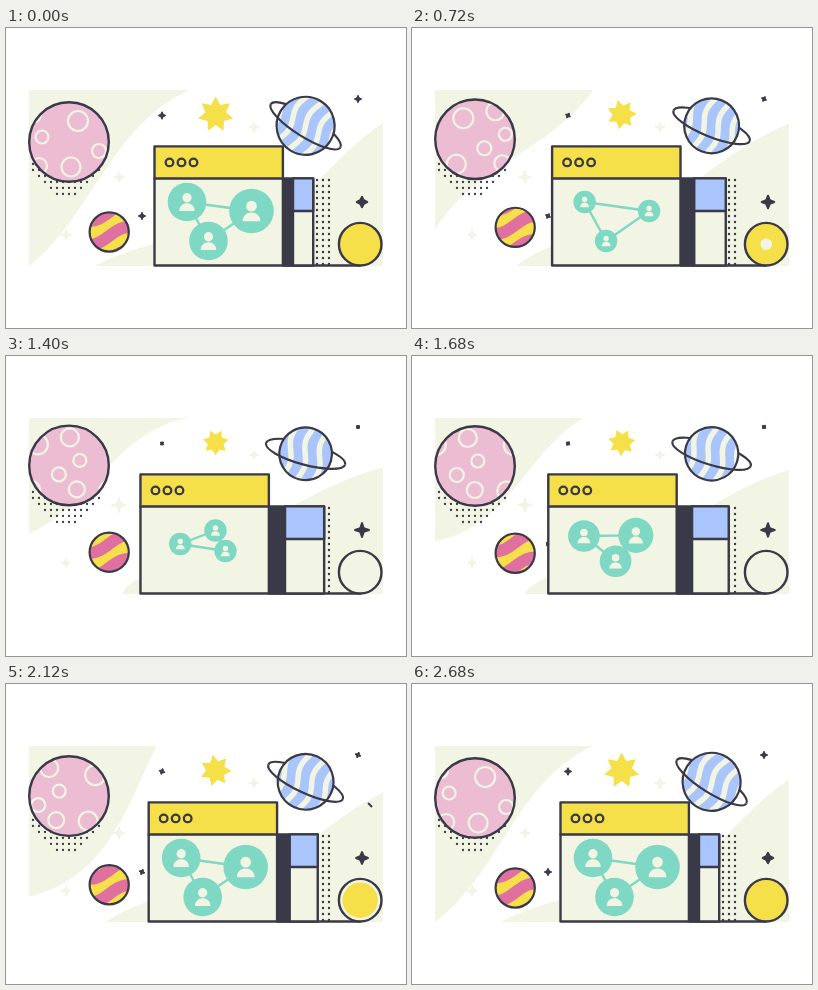
An HTML page with a canvas for the animation above (2.72 s loop, 400x300 px).

```html
<!DOCTYPE html>
<html lang="en">
<head>
<meta charset="utf-8">
<title>Planets and network</title>
<style>
html, body { margin: 0; width: 100%; height: 100%; overflow: hidden; background: #fff; }
canvas { display: block; width: 400px; height: 300px; }
</style>
</head>
<body>
<canvas id="stage" width="400" height="300"></canvas>
<script>
const LOOP = 2720, STEP = 40, TAU = Math.PI * 2;
const INK = '#3a3947', CREAM = '#f2f4e4', YELLOW = '#f6e04a', PINK = '#ecbcd3',
      ROSE = '#e0709f', BLUE = '#a9c5fc', TEAL = '#7fd8c3';
const c = document.getElementById('stage').getContext('2d');
c.lineJoin = 'round';

const { sin, cos, max, min } = Math;
const lerp = (a, b, k) => a + (b - a) * k;
const clamp = k => max(0, min(1, k));
const ease = k => (1 - cos(Math.PI * clamp(k))) / 2;
const span = (t, a, b) => ease((t - a) / (b - a));
const mod = (v, n) => ((v % n) + n) % n;

function paint(fill, stroke, width = 2.4) {
  if (fill) { c.fillStyle = fill; c.fill(); }
  if (stroke) { c.strokeStyle = stroke; c.lineWidth = width; c.stroke(); }
}
function disc(x, y, r, fill, stroke, width) {
  c.beginPath();
  c.arc(x, y, max(0, r), 0, TAU);
  paint(fill, stroke, width);
}
function box(x, y, w, h, fill, stroke) {
  c.beginPath();
  c.rect(x, y, w, h);
  paint(fill, stroke);
}
function line(x1, y1, x2, y2, color, width) {
  c.beginPath();
  c.moveTo(x1, y1);
  c.lineTo(x2, y2);
  paint(null, color, width);
}
function star(x, y, points, outer, inner, turn, color, round) {
  c.beginPath();
  for (let i = 0; i < points * 2; i++) {
    const a = turn - Math.PI / 2 + i * Math.PI / points, r = i % 2 ? inner : outer;
    c.lineTo(x + r * cos(a), y + r * sin(a));
  }
  c.closePath();
  paint(color, round && color, round);
}
// Globe at the current origin: fill, clipped pattern, outline
function globe(r, color, pattern, width) {
  disc(0, 0, r, color);
  c.save();
  c.clip();
  pattern();
  c.restore();
  disc(0, 0, r, null, INK, width);
}
function at(x, y, draw) {
  c.save();
  c.translate(x, y);
  draw();
  c.restore();
}

// Two cream hills whose edges sway over the loop
function land(p, k) {
  const a = TAU * p;
  c.save();
  c.beginPath();
  c.rect(23, 62, 354, 176);
  c.clip();

  const top = 175 + 15 * sin(a) + 10 * cos(2 * a - 0.6), side = lerp(238, 177, k);
  const dx = top - 23, dy = side - 62, len = Math.hypot(dx, dy);
  const bend = (u, out) => [top - dx * u + out * dy / len, 62 + dy * u + out * dx / len];
  c.beginPath();
  c.moveTo(23, 62);
  c.lineTo(top, 62);
  c.bezierCurveTo(...bend(1 / 3, -8 - 26 * cos(2 * a)), ...bend(2 / 3, 13 - 35 * sin(a)), 23, side);
  paint(CREAM);

  const y = 103 - 11 * sin(a + 0.8);
  c.beginPath();
  c.moveTo(377, 238);
  c.lineTo(377, y);
  c.quadraticCurveTo(lerp(348, 335, k), y + lerp(18, 10, k), lerp(290, 270, k), y + lerp(82, 48, k));
  c.lineTo(165, 212);
  c.quadraticCurveTo(125, 220, lerp(88, 116, k), 238);
  paint(CREAM);
  c.restore();
}

function sparkles(k) {
  const spark = (x, y, a, b, color, turn = 0) => {
    const r = lerp(a, b, k);
    star(x, y, 4, r, 1 + r * 0.2, turn, color, 1);
  };
  spark(113, 149, 5, 7.5, CREAM);
  spark(60, 207, 5.5, 4.5, CREAM);
  spark(248, 99, 5.5, 4.5, CREAM);
  for (const [x, y] of [[156, 87.5], [352, 71], [136, 188]])
    spark(x, y, 3.8, 2, INK, k * Math.PI / 4);
  star(356, 174, 4, lerp(5.2, 7, k), 2.5, 0, INK, 2);
}

function meteor(t, start, x, y, dx, dy, color) {
  const head = span(t, start, start + 240), tail = 1 - (1 - clamp((t - start - 40) / 620)) ** 2;
  if (head > 0 && tail < 1) {
    const q = min(tail, head);
    line(x + dx * q, y + dy * q, x + dx * head, y + dy * head, color, 2);
  }
}

// x, y, radius from the middle of the moon
const CRATERS = [[9, -21, 10], [-27, -5, 6.5], [30, 9, 7], [2, 25, 9.5], [-30, 24, 8], [41, -28, 9]];

function moon(p, k) {
  for (let row = 0; row < 6; row++) {
    const half = min(33, 39 - 6 * row);
    for (let x = -half; x <= half; x += 6) disc(60 + x, 136 + 6 * row, 1.15, INK);
  }
  at(63, 114 - 4.6 * k, () => globe(39.8, PINK, () => {
    for (const [x, y, r] of CRATERS) {
      const cx = mod(x - 78 * p + 53, 78) - 53;
      disc(cx, y, r, null, CREAM, 2.2);
      disc(cx + 78, y, r, null, CREAM, 2.2);
    }
  }));
}

function marble(p, k) {
  at(103.2, 204 - 7.8 * k, () => globe(19.6, YELLOW, () => {
    for (let n = -1; n < 3; n++) {
      c.beginPath();
      for (let x = -24; x <= 24; x += 2)
        c.lineTo(x, 4 + 24 * (n - p) - 7 * sin(x / 11) - x * 0.1);
      paint(null, ROSE, 12);
    }
  }, 2.2));
}

function planet(p, k) {
  const ring = (a, b) => {
    c.beginPath();
    c.ellipse(0, 0, 41, 11, 0, a, b);
    paint(null, INK, 2.2);
  };
  at(299.6, 97.8, () => {
    c.rotate(lerp(32, 15, k) * Math.PI / 180);
    ring(Math.PI, TAU);
    globe(lerp(29, 26.3, k), BLUE, () => {
      for (let n = -2; n < 5; n++) {
        c.beginPath();
        for (let y = -32; y <= 32; y += 2)
          c.lineTo(15 * (n - 2 * p % 1) + 2.8 * sin(y / 7.5), y);
        paint(null, CREAM, 5.5);
      }
    }, 2.2);
    ring(0, Math.PI);
  });
}

function ball(t) {
  const x = 354.2, y = 216.2, r = 21.3;
  disc(x, y, r, YELLOW);
  disc(x, y, r * span(t, 490, 1150), CREAM);
  disc(x, y, r * span(t, 1740, 2260), YELLOW);
  disc(x, y, r, null, INK);
}

// Each node: resting place, gathered place, full radius; x from the window edge
const NODES = [
  { from: [32.5, 174], to: [39.8, 188], r: 19.3 },
  { from: [97, 183], to: [75, 174.5], r: 22.3 },
  { from: [54, 213], to: [85, 195], r: 19.3 }
];

function person(x, y, r) {
  disc(x, y, r, TEAL);
  disc(x, y - r * 0.22, r * 0.24, CREAM);
  c.beginPath();
  c.moveTo(x - r * 0.4, y + r * 0.46);
  c.bezierCurveTo(x - r * 0.4, y - r * 0.06, x + r * 0.4, y - r * 0.06, x + r * 0.4, y + r * 0.46);
  paint(CREAM);
}

function network(t, left) {
  const back = span(t, 1440, 1880);
  const shrink = span(t, 360, 720) - back, gather = span(t, 720, 1160) - back;
  const nodes = NODES.map(({ from, to, r }) => [
    left + lerp(from[0], to[0], gather), lerp(from[1], to[1], gather), lerp(r, 11.2, shrink)
  ]);
  nodes.forEach(([x, y], i) => {
    const [u, v] = nodes[(i + 1) % 3];
    line(x, y, u, v, TEAL, 2.4);
  });
  for (const n of nodes) person(...n);
}

function browser(t, k) {
  const left = lerp(148.5, 134.4, k), right = left + 128.4;
  const fold = lerp(287, 279, k), edge = lerp(307.2, 318.2, k);
  for (let x = 311; x < 325; x += 6)
    for (let y = 152; y < 237; y += 6) disc(x, y, 1.2, INK);
  line(right, 237.5, 354.5, 237.5, INK, 2.4);
  box(fold, 150.4, edge - fold, 87.1, CREAM, INK);
  box(fold, 150.4, edge - fold, 32.6, BLUE, INK);
  box(right, 149.2, fold - right, 89.5, INK);
  box(left, 150.4, 128.4, 87.1, CREAM, INK);
  box(left, 118.4, 128.4, 32, YELLOW, INK);
  for (let i = 0; i < 3; i++) disc(left + 15 + 12 * i, 134.4, 3.8, null, INK, 2.3);
  network(t, left);
}

function draw(t) {
  const p = t / LOOP, half = (LOOP - STEP) / 2;
  const k = ease((1 - Math.abs(t - half) / half) ** 0.93);  // out and back
  c.fillStyle = '#fff';
  c.fillRect(0, 0, 400, 300);
  land(p, k);
  sparkles(k);
  meteor(t, 200, 147, 106, -27, 17, CREAM);
  meteor(t, 1720, 344, 100, 22, 23, INK);
  moon(p, k);
  marble(p, k);
  planet(p, k);
  star(209.7, 86.5, 7, lerp(18, 13, k), lerp(10.5, 8, k), -k * TAU / 14, YELLOW);
  browser(t, k);
  ball(t);
}

const start = performance.now();
function tick() {
  const t = (performance.now() - start) % LOOP;
  draw(Math.floor(t / STEP) * STEP);
  requestAnimationFrame(tick);
}
tick();
</script>
</body>
</html>
```
